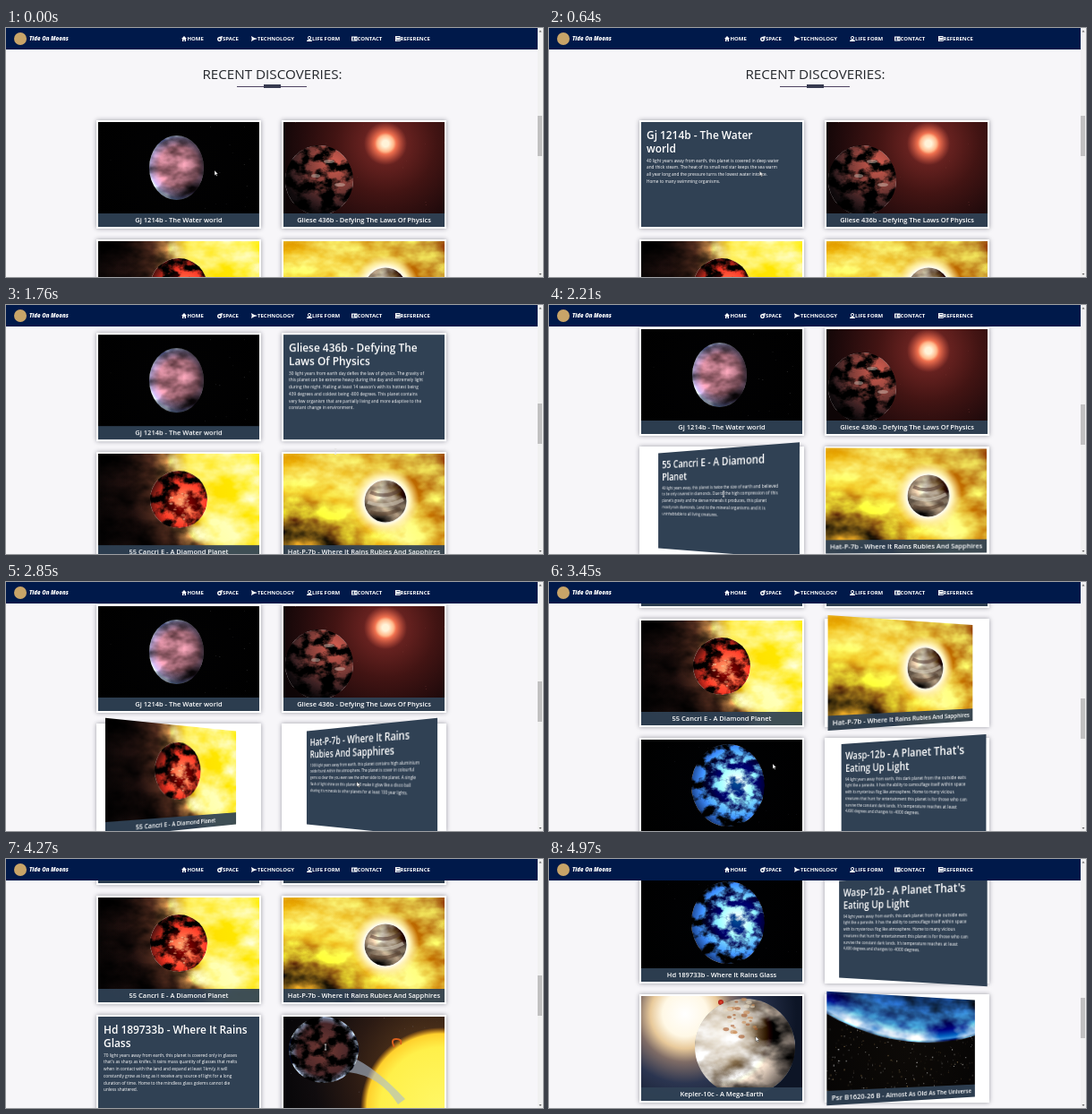
Write an HTML page that moves like this. It is 600 px wide and 278 px high and loops after 5 s.

```html
<!DOCTYPE html>
<html lang="en">
<head>
<meta charset="utf-8">
<style>
  html, body { margin: 0; width: 100%; height: 100%; overflow: hidden; }
  body { position: relative; background: #f7f6f9; font-family: "Open Sans", "Noto Sans", sans-serif; color: #fff; }
  div, svg, h1, h2, p { position: absolute; margin: 0; white-space: pre; }
  #page { left: 0; top: 0; width: 593px; height: 700px; will-change: transform; }
  h1 { left: 0; width: 595px; top: 41px; text-align: center; font: 500 15.2px/20px "Open Sans", sans-serif; color: #24272c; }
  .rule { left: 258px; top: 64.5px; width: 78px; height: 1.5px; background: #4e4362; }
  .rule::after { content: ""; position: absolute; left: 30px; top: -1.5px; width: 19px; height: 4px; background: #373a50; }
  .card { width: 180px; height: 117px; background: #fff; box-shadow: 0 0 0 2px #fff, 0 0 5px 2px #9a9aa4; }
  .face { inset: 0; overflow: hidden; backface-visibility: hidden; will-change: transform; background: #304154; }
  .face svg { left: 0; top: 0; }
  .caption { left: 0; right: 0; bottom: 0; height: 15px; text-align: center; font: 600 7.5px/15px "Open Sans", sans-serif; background: rgba(48, 66, 86, .93); }
  h2 { left: 6px; top: 6.5px; font: 600 11.9px/15px "Open Sans", sans-serif; }
  p { left: 6px; top: 39.5px; font-size: 4.75px; font-weight: 500; line-height: 7.75px; }
  #nav { left: 0; top: 0; width: 593.5px; height: 23.5px; background: #00194a; font: 700 6px/8px "Open Sans", sans-serif; }
  #nav div { top: 8px; }
  #nav svg { top: 9px; fill: #fff; }
  #nav .mark { left: 9px; top: 5px; width: 14px; height: 14px; border-radius: 50%; background: #c8a468; }
  #nav .brand { left: 26px; font: italic 800 6.1px/8px "Open Sans", sans-serif; }
  #bar { left: 593.5px; top: 0; width: 6.5px; height: 278px; background: #f1f1f1; }
  #thumb { left: .5px; width: 5px; height: 45px; background: #c1c1c1; }
  #bar svg { left: 0; top: 0; fill: #666; }
  #pointer { left: 0; top: 0; overflow: visible; }
</style>
</head>
<body>
<svg width="0" height="0" color-interpolation-filters="sRGB">
  <filter id="rough" x="0" y="0" width="1" height="1">
    <feTurbulence type="fractalNoise" baseFrequency=".07 .09" numOctaves="4" seed="4"/>
    <feColorMatrix values="4 0 0 0 -1.500 4 0 0 0 -1.500 4 0 0 0 -1.500 0 0 0 0 1"/>
    <feBlend mode="overlay" in2="SourceGraphic"/>
    <feComposite operator="in" in2="SourceAlpha"/>
  </filter>
  <filter id="cloud" x="0" y="0" width="1" height="1">
    <feTurbulence type="fractalNoise" baseFrequency=".025 .04" numOctaves="4" seed="9"/>
    <feColorMatrix values="2 0 0 0 -.45 2 0 0 0 -.45 2 0 0 0 -.45 0 0 0 0 1"/>
    <feBlend mode="overlay" in2="SourceGraphic"/>
    <feComposite operator="in" in2="SourceAlpha"/>
  </filter>
</svg>
<div id="page"><h1>RECENT DISCOVERIES:</h1><div class="rule"></div></div>
<div id="nav"><div class="mark"></div><div class="brand">Tide On Moons</div></div>
<div id="bar"><svg width="7" height="278"><path d="M1.500 4.500l1.500-2 1.500 2zM1.500 274l1.500 2 1.500-2z"/></svg><div id="thumb"></div></div>
<svg id="pointer" width="10" height="10">
  <path id="arrow" d="M0 0v5.500l1.300-1.100 .9 1.900 .9-.4-.9-1.900h1.700z" fill="#fff" stroke="#222" stroke-width=".4"/>
  <path id="beam" d="M-1.200-3h2.400M0-3v6M-1.200 3h2.400" stroke="#e4e4e4" stroke-width=".8"/>
</svg>
<script>
const LOOP = 5000, FLIP = 333, NOTCH = 39;
const $ = id => document.getElementById(id);

let seed = 7;
const rnd = (a = 0, b = 1) => a + (b - a) * ((seed = seed * 16807 % 2147483647) / 2147483647);
const repeat = (n, f) => Array.from({ length: n }, f).join('');

// --- picture helpers; colour stops are spaced evenly unless written "colour@offset"
let gradients = 0;
function paint(cx, cy, r, ...stops) {
  const id = 'g' + gradients++;
  const list = stops.map((s, i) => {
    const [color, at = i / (stops.length - 1)] = s.split('@');
    return `<stop offset="${at}" stop-color="${color}"/>`;
  }).join('');
  return [`<radialGradient id="${id}" gradientUnits="userSpaceOnUse" cx="${cx}" cy="${cy}" r="${r}">${list}</radialGradient>`, `url(#${id})`];
}
const backdrop = (...g) => { const [def, fill] = paint(...g); return `${def}<path d="M0 0h180v117H0z" fill="${fill}"/>`; };
const disc = (cx, cy, rx, ry, ...g) => {
  const [def, fill] = paint(...g);
  return `${def}<ellipse cx="${cx}" cy="${cy}" rx="${rx}" ry="${ry}" fill="${fill}"/>`;
};
const textured = (filter, shapes) => `<g filter="url(#${filter})">${shapes}</g>`;
const blobs = (n, cx, cy, r, size, colors, flat = .5) => repeat(n, () => {
  const a = rnd(0, 6.283), d = r * Math.sqrt(rnd()), s = rnd(.3, 1) * size;
  return `<ellipse cx="${cx + d * Math.cos(a)}" cy="${cy + d * Math.sin(a)}" rx="${s}" ry="${s * flat}" fill="${colors[Math.floor(rnd(0, colors.length))]}" opacity=".6"/>`;
});
const stars = (n, top, size, colors) => repeat(n, () =>
  `<circle cx="${rnd(0, 180)}" cy="${rnd(top, 104)}" r="${rnd(.2, size)}" fill="${colors[Math.floor(rnd(0, colors.length))]}"/>`);

const pictures = [
  () => backdrop(90, 50, 110, '#020203', '#000') + stars(22, 0, .4, ['#555', '#777']) +
    textured('cloud', disc(87.500, 51, 30.500, 36, 90, 50, 37, '#8a5660', '#85545f@.6', '#6c5f7c@.85', '#7f9cc4')) +
    disc(87.500, 51, 30.500, 36, 70, 46, 52, '#0000@.5', '#150c12b0'),
  () => backdrop(114, 24, 125, '#a3453b', '#65211f@.2', '#421413@.45', '#230b0c@.75', '#0d0506') +
    stars(16, 0, .4, ['#8a4a42']) +
    disc(114, 24, 24, 24, 114, 24, 24, '#fff3d8@.15', '#ffb98c@.38', '#f0714f@.5', '#c44b3b00') +
    textured('rough', disc(40, 65, 38, 39, 57, 46, 58, '#6b2f28', '#44201d@.45', '#1d1011@.8', '#080506')) +
    '<g fill="#d9c9bd" opacity=".45"><ellipse cx="51" cy="44" rx="6" ry="2"/><ellipse cx="36" cy="60" rx="5" ry="2"/><ellipse cx="63" cy="70" rx="6" ry="2"/></g>',
  () => textured('cloud', backdrop(260, 0, 270, '#fffdb0', '#fff56c@.35', '#ffee55@.59', '#e3c463@.64', '#80592f@.68', '#341c13@.74', '#100807@.85', '#050303')) +
    textured('rough', disc(90, 51, 32, 32, 96, 56, 38, '#cf5a3c', '#a02c1d@.45', '#6a160f@.75', '#2e0a08')) +
    blobs(22, 92, 60, 16, 2.500, ['#f2c79a', '#e89a6c']),
  () => textured('cloud', backdrop(10, 150, 215, '#5c430f', '#7d5a14@.3', '#b98a1c@.4', '#f3cb2b@.5', '#f8da4c@.62', '#e6bd38@.78', '#c99c34')) +
    disc(114, 53, 38, 38, 114, 53, 38, '#fff@.6', '#fff3b8@.72', '#ffe58a00') +
    textured('cloud', disc(114, 53, 23.500, 23.500, 120, 45, 35, '#c0b09a', '#857562@.5', '#3a3128')) +
    '<g fill="none" stroke-width="4" opacity=".55"><path d="M97 43q17 8 34-3" stroke="#4d332b"/><path d="M94 54q20 8 40-3" stroke="#ddd5c4"/><path d="M97 65q17 6 34-4" stroke="#59402e"/></g>',
  () => backdrop(90, 50, 110, '#010204', '#000') + stars(15, 0, .3, ['#445']) +
    textured('rough', disc(97, 51, 41, 46, 107, 48, 54, '#86a8ca', '#4a7ab4@.4', '#234f8c@.7', '#0a1a3a')),
  () => backdrop(165, 62, 175, '#6a4520', '#2b1a13@.5', '#100c0e@.75', '#050507') +
    stars(25, 0, .4, ['#665', '#889']) +
    disc(176, 102, 90, 90, 176, 102, 90, '#fff766', '#fff04a@.75', '#ffd02c@.92', '#ff9b1400') +
    '<path d="M124 34q-5-9 2-9t5 6" fill="none" stroke="#d8601c" stroke-width="2"/>' +
    '<path d="M76 45Q102 56 136 92L128 98Q108 66 73 62z" fill="#a9bbd0" opacity=".6"/>' +
    textured('rough', disc(45, 37, 39, 37, 45, 37, 39, '#3a1d1a', '#241314@.75', '#363a46@.9', '#8494a6')),
  () => backdrop(49, 20, 125, '#fff', '#fff8e6@.2', '#e8c99a@.31', '#7f6c66@.43', '#2b3550@.62', '#0d1526') +
    disc(89, 7, 3, 3, 89, 7, 3, '#e2452f', '#a81d15') +
    textured('cloud', disc(116, 57, 56, 54, 88, 42, 92, '#f3ece0', '#cdc1b0@.35', '#80756b@.65', '#1d1a19')) +
    blobs(34, 112, 25, 22, 4, ['#a65627', '#c98a54', '#e6d8c2'], .6),
  () => backdrop(90, 60, 120, '#0d0a07', '#050404') + stars(300, 20, .6, ['#fff', '#c2a067', '#7a6340', '#9d9a94']) +
    textured('cloud', disc(115, -190, 242, 242, 115, -190, 242, '#0f2f5e@.8', '#2f6fb5@.93', '#9cc6ee@.985', '#28507f'))
];

// --- cards: caption, back heading, back text, moments when the card turns round
const cards = [
  ['Gj 1214b - The Water world', 'Gj 1214b - The Water\nworld', '40 light years away from earth, this planet is covered in deep water\nand thick steam. The heat of its small red star keeps the sea warm\nall year long and the pressure turns the lowest water into ice.\nHome to many swimming organisms.', [0, 1007]],
  ['Gliese 436b - Defying The Laws Of Physics', 'Gliese 436b - Defying The\nLaws Of Physics', "30 light years from earth day defies the law of physics. The gravity of\nthis planet can be extreme heavy during the day and extremely light\nduring the night. Hailing at least 14 season's with its hottest being\n439 degrees and coldest being -800 degrees. This planet contains\nvery few organism that are partially living and more adaptive to the\nconstant change in environment.", [1064, 1810]],
  ['55 Cancri E - A Diamond Planet', '55 Cancri E - A Diamond\nPlanet', "40 light years away, this planet is twice the size of earth and believed\nto be only covered in diamonds. Due to the high compression of this\nplanet's gravity and the dense minerals it produces, this planet\nmostly rain diamonds. Lend to the mineral organisms and it is\nuninhabitable to all living creatures.", [2033, 2687]],
  ['Hat-P-7b - Where It Rains Rubies And Sapphires', 'Hat-P-7b - Where It Rains\nRubies And Sapphires', "1000 light years away from earth, this planet contains high aluminium\noxide found within the atmosphere. The planet is cover in colourful\ngems so clear the you even see the other side to the planet. A single\nflash of light shine on this planet will make it glow like a disco ball\nsharing it's minerals to other planets for at least 100 year lights.", [1810, 1985, 2687, 3267]],
  ['Hd 189733b - Where It Rains Glass', 'Hd 189733b - Where It Rains\nGlass', "70 light years away from earth, this planet is covered only in glasses\nthat's as sharp as knifes. It rains mass quantity of glasses that melts\nwhen in contact with the land and expand at least 1km/y, it will\nconstantly grow as long as it receive any source of light for a long\nduration of time. Home to the mindless glass golems cannot die\nunless shattered.", [3470, 4295]],
  ["Wasp-12b - A Planet That's Eating Up Light", "Wasp-12b - A Planet That's\nEating Up Light", "94 light years away from earth, this dark planet from the outside eats\nlight like a parasite. It has the ability to camouflage itself within space\nwith its mysterious flog like atmosphere. Home to many vicious\ncreatures that hunt for entertainment this planet is for those who can\nsurvive the constant dark lands. It's temperature reaches at least\n4,600 degrees and changes to -4000 degrees.", [3267, 3470, 4295, 4930]],
  ['Kepler-10c - A Mega-Earth', '', '', []],
  ['Psr B1620-26 B - Almost As Old As The Universe', '', '', [4930]]
];
$('page').insertAdjacentHTML('beforeend', cards.map(([caption, title, text], i) => `
  <div class="card" style="left:${i % 2 ? 310 : 103}px;top:${105 + 133 * (i >> 1)}px">
    <div class="face"><svg width="180" height="117">${pictures[i]()}</svg><div class="caption">${caption}</div></div>
    <div class="face"><h2>${title}</h2><p>${text}</p></div>
  </div>`).join(''));
const faces = [...document.querySelectorAll('.card')].map(c => c.querySelectorAll('.face'));

// --- menu: label, icon x, label x, icon path in a 6 by 6 box
const menu = [
  ['HOME', 196, 202.500, 'M0 3L3 0l3 3H5v3H3.600V4H2.400v2H1V3z'],
  ['SPACE', 236, 242, 'M6 0L5 3A2.500 2.500 0 1 1 2 1zM2.500 2.500a1 1 0 1 0 .1 0z'],
  ['TECHNOLOGY', 274, 281, 'M0 0l3 1.700 4 1.300-4 1.300L0 6l.7-3z'],
  ['LIFE FORM', 335.500, 342, 'M3 0a2 2 0 1 0 .1 0M3 1a1 1 0 1 1-.1 0M0 6q0-2 2-2h2q2 0 2 2z'],
  ['CONTACT', 386, 392.500, 'M0 .5h6.500v5H0zM2 1.500a.8.800 0 1 0 .1 0M1 4.500h2.200V3.600H1M4 2h1.800v.6H4M4 3.500h1.800v.6H4'],
  ['REFERENCE', 434.500, 440.500, 'M0 0h5.500v6H0zM1.500 1.300v.6h3v-.6M1 4.600v.6h4v-.6']
];
$('nav').insertAdjacentHTML('beforeend', menu.map(([label, x, textX, d]) =>
  `<svg width="7" height="6" style="left:${x}px"><path fill-rule="evenodd" d="${d}"/></svg><div style="left:${textX}px">${label}</div>`).join(''));

// --- motion
function ease(x) {
  let lo = 0, hi = 1, u;
  for (let i = 0; i < 20; i++) {
    u = (lo + hi) / 2;
    if (.75 * u * (1 - u) + u ** 3 < x) lo = u; else hi = u;
  }
  return .3 * u * (1 - u) ** 2 + 3 * u * u * (1 - u) + u ** 3;
}
function turned(toggles, t) {
  let from = 0, to = 0, start = 0, span = 1;
  const at = time => time - start >= span ? to : from + (to - from) * ease((time - start) / span);
  for (const time of toggles) {
    if (t < time) break;
    from = at(time);
    to = 1 - to;
    start = time;
    span = FLIP * Math.abs(to - from);
  }
  return at(t);
}
// Keys are [time, ...values]
function track(keys, t) {
  const i = keys.findIndex(k => k[0] > t);
  if (i < 0) return keys[keys.length - 1].slice(1);
  const a = keys[i - 1], b = keys[i], u = (t - a[0]) / (b[0] - a[0]), s = u * u * (3 - 2 * u);
  return a.slice(1).map((v, j) => v + (b[j + 1] - v) * s);
}
// Scroll in wheel notches
const scrollKeys = [[0, 0], [1670, 0], [1780, 2], [3080, 2], [3230, 5], [4710, 5], [4900, 9]];
const pointerKeys = [[0, 233, 159], [930, 236, 160], [1007, 284, 160], [1064, 311, 160], [1250, 369, 160], [1910, 368, 164],
  [1985, 309, 185], [2033, 283, 200], [2190, 195, 211], [2620, 200, 212], [2700, 350, 219], [2840, 392, 223],
  [3400, 390, 220], [3450, 250, 203], [4225, 250, 205], [4270, 357, 210], [4910, 357, 207], [4965, 231, 198]];
const overText = t => t > 1150 && t < 1910 || t > 2120 && t < 2620 || t > 4250 && t < 4400;

function draw(now) {
  const t = now % LOOP;
  const [notches] = track(scrollKeys, t), [x, y] = track(pointerKeys, t);
  const scroll = notches * NOTCH;
  $('page').style.transform = `translateY(${-scroll}px)`;
  $('thumb').style.top = 98 + scroll * .163 + 'px';
  faces.forEach(([front, back], i) => {
    const angle = 180 * turned(cards[i][3], t);
    front.style.transform = `perspective(439px) rotateY(${angle}deg)`;
    back.style.transform = `perspective(439px) rotateY(${angle - 180}deg)`;
  });
  $('pointer').style.transform = `translate(${x}px, ${y}px)`;
  $('arrow').style.display = overText(t) ? 'none' : '';
  $('beam').style.display = overText(t) ? '' : 'none';
}
const begin = performance.now();
(function frame() {
  draw(performance.now() - begin);
  requestAnimationFrame(frame);
})();
</script>
</body>
</html>
```
